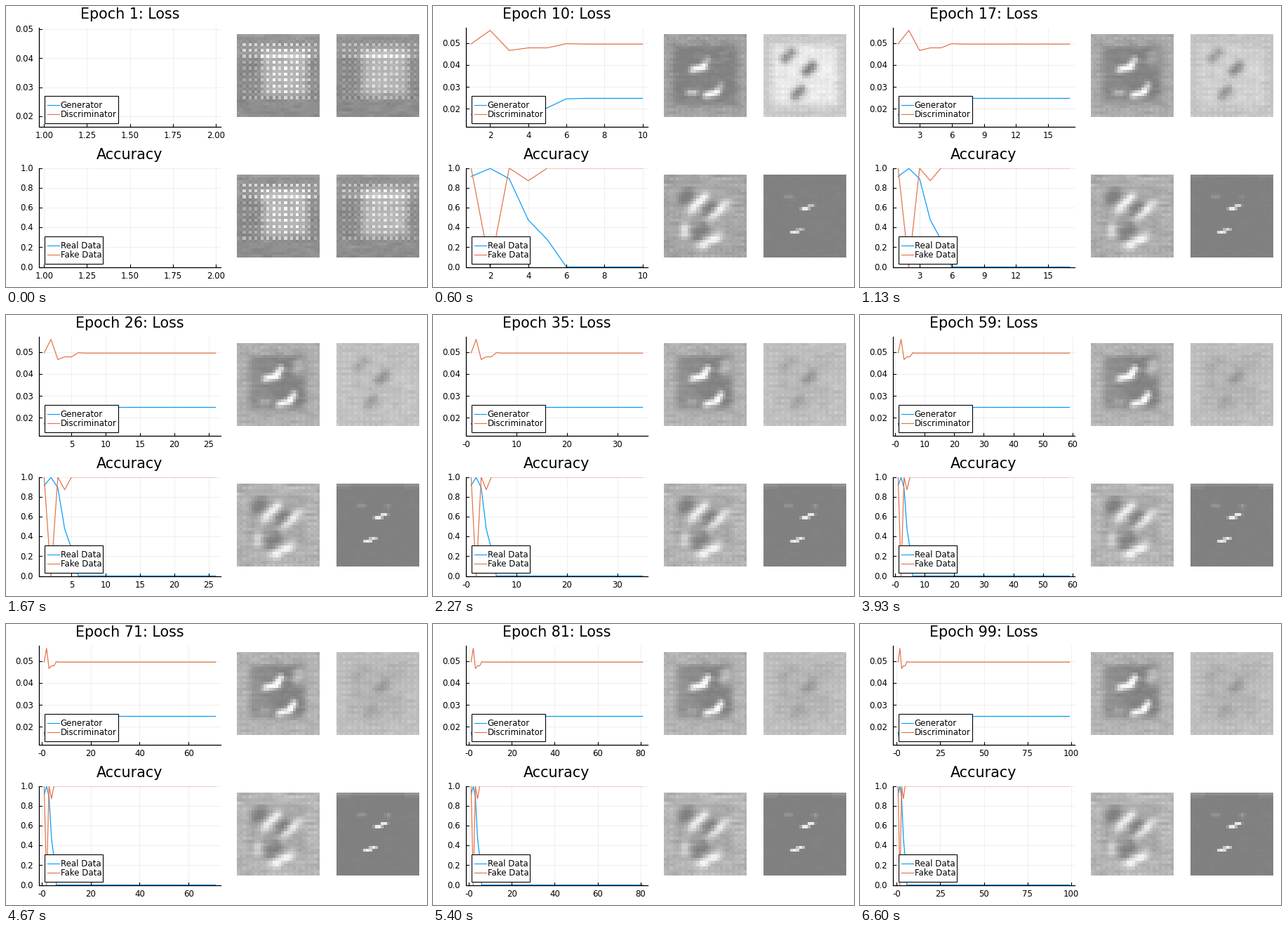
Write a matplotlib script that moves like this. It is 600x400 px and loops after 6.67 s.

```python
import numpy as np
import matplotlib.pyplot as plt
from matplotlib.animation import FuncAnimation
from matplotlib.patches import Rectangle

W, H, EPOCHS, LOOP_MS = 600, 400, 100, 6670
BLUE, ORANGE = "#009af9", "#e26f46"
LEFT, RIGHT, TOP, BOTTOM, DROP = 47, 306, 30.7, 171.5, 200
PX = 0.72  # points per pixel at 100 dpi

plt.rcParams["font.family"] = "DejaVu Sans"
fig = plt.figure(figsize=(W / 100, H / 100), dpi=100, facecolor="white")
ax = fig.add_axes([0, 0, 1, 1])


def text(x, y, s, size=11.77, ha="center"):
    return ax.text(x, y, s, fontsize=size * PX, ha=ha, va="baseline", zorder=6)


def line(xs, ys, color="black", lw=1.1, z=3, **kw):
    return ax.plot(xs, ys, color=color, lw=lw * PX, zorder=z, **kw)[0]


# ---- training history -------------------------------------------------
def history(rest, *start):
    return np.array(start + (rest,) * (EPOCHS - len(start)))


gen = history(.0248, .01747, .01327, .0165, .0186, .0205, .0246)
disc = history(.0495, .0496, .05576, .0466, .0478, .0478, .0497)
real = history(0, .915, .996, .893, .475, .277)
fake = history(1, 1, 0, 1, .872)
epochs = np.arange(1, EPOCHS + 1)


# ---- axis scaling and ticks -------------------------------------------
def padded(lo, hi):
    pad = 0.03 * (hi - lo)
    return lo - pad, hi + pad


def ticks(lo, hi):
    """Pick round ticks by scoring count, zero, coverage and niceness."""
    span, best, found = hi - lo, -np.inf, None
    top = int(np.floor(np.log10(span)))
    for z in (top, top - 1):
        for q, nice in ((5, .9), (3, .2), (2.5, .5), (2, .7), (1, 1)):
            step = q * 10.0 ** z
            k = np.arange(np.ceil(lo / step), np.floor(hi / step) + 1)
            if len(k) < 4:
                continue
            count = max(0, 1 - abs(len(k) - 5) / 5)
            cover = 1.5 * span / ((len(k) - 1) * step)
            score = count / 4 + (0 in k) / 6 + cover / 3 + nice / 4
            if score > best + 1e-9:
                best, found = score, k * step
    return found


def labels(values):
    for digits in range(4):
        if np.allclose(values, np.round(values, digits), atol=1e-6):
            break
    return [f"{v:.{digits}f}" for v in values]


def to_x(v, lim):
    return LEFT + (np.asarray(v) - lim[0]) / (lim[1] - lim[0]) * (RIGHT - LEFT)


def to_y(v, lim, drop=0):
    return drop + BOTTOM - (np.asarray(v) - lim[0]) / (lim[1] - lim[0]) * (BOTTOM - TOP)


def x_ticks(lim, drop):
    parts = []
    values = ticks(*lim)
    for x, s in zip(to_x(values, lim), labels(values)):
        parts += [line([x, x], [TOP + drop, BOTTOM + drop], lw=.8, z=1, alpha=.08),
                  line([x, x], [BOTTOM + drop, BOTTOM + drop - 4]),
                  text(x, 187.6 + drop, s)]
    return parts


def y_ticks(values, lim, drop=0):
    parts = []
    for y, s in zip(to_y(values, lim, drop), labels(values)):
        parts += [line([LEFT, RIGHT], [y, y], lw=.8, z=1, alpha=.08),
                  line([LEFT, LEFT + 4], [y, y]),
                  text(39, y + 4.3, s, ha="right")]
    return parts


def legend(names, right, drop):
    y = 128 + drop
    ax.add_patch(Rectangle((55.4, y), right - 55.4, 38.5, fc="white", ec="black",
                           lw=1.1 * PX, zorder=5))
    for i, (name, color) in enumerate(zip(names, (BLUE, ORANGE))):
        mid = y + 13 + 13 * i
        line([58.5, 76], [mid, mid], color, z=6)
        text(77.6, mid + 4.4, name, ha="left")


def curve(color, drop):
    clip = Rectangle((LEFT, TOP + drop), RIGHT - LEFT, BOTTOM - TOP, transform=ax.transData)
    art = line([], [], color, lw=1.2, z=2)
    art.set_clip_path(clip)
    return art


# ---- generated pictures -----------------------------------------------
N = 28
row, col = np.mgrid[0:N, 0:N].astype(float)
mesh = (row % 2 == 1) & (col % 2 == 0)


def blob(cx, cy, length, width, angle=0):
    a = np.radians(angle)
    dx, dy = col - cx, row - cy
    u = dx * np.cos(a) + dy * np.sin(a)
    v = dy * np.cos(a) - dx * np.sin(a)
    return np.exp(-(u / length) ** 4 / 2 - (v / width) ** 2 / 2)


def box(c0, c1, r0, r1, soft=.7):
    def edge(d):
        return 1 / (1 + np.exp(-d / soft))
    return edge(col - c0) * edge(c1 - col) * edge(row - r0) * edge(r1 - row)


def grain(seed, size):
    g = np.random.default_rng(seed).normal(0, size, (N, N))
    return (g + np.roll(g, 1, 1) + np.roll(g, 2, 1)) / 1.7


def untrained(seed, gain):
    """Checkered upsampling pattern of the first epoch."""
    mid = box(8, 23.5, 4.5, 20.5)
    area = box(.5, 26.5, 1.5, 22.5, .3)
    band = box(-2, 30, 1.5, 7.5, .3)
    img = 142 + 38 * mid + 12 * band + 14 * (row < 1)
    img += gain * area * mesh * (26 + 22 * mid + 34 * band + 14 * (row == 21))
    img += gain * 22 * mid * mesh * ((col % 4 == 0) & (col >= 12))
    img -= 9 * area * (1 - mid) * ((row + col) % 2 == 0)
    img += 16 * (row == 7) * box(7, 25, 0, 27)
    return img + grain(seed, 4)


wide, narrow = box(2.5, 24.5, 3, 23.5), box(3.7, 22.5, 3.7, 21.7)
left_haze = box(3, 10, 4, 21, 1.2)


# Each picture function blends its early look into its late one.
def mix(a, b, late):
    return a + (b - a) * late


def bent_strokes(late):
    inner = mix(wide, narrow, late)
    img = mix(162 - 33 * wide, 178 - 48 * narrow + 17 * left_haze, late)
    img += 8 * mesh * (1 - inner)
    for cx, cy in ((11.2, 11), (15.6, 19.7)):
        img += mix(125, 115, late) * blob(cx, cy, 2.6, .8, -12)
        img += mix(52, 109, late) * blob(cx + 2.7, cy - 2.2, 1.7, .9, -45)
    img += mix(8, 58, late) * blob(20.3, 8, 2.4, 1.5, -70)
    return img + mix(85, 32, late) * blob(9, 19.3, 1.8, .7)


def dark_spots(late):
    img = mix(198 + 36 * wide, 187 - 8 * narrow, late) + 8 * mesh
    for cx, cy, left in ((8, 6.8, 7), (15, 11.3, 26), (11.3, 19.2, 17)):
        img -= mix(78 + left, left, late) * blob(cx, cy, 2.7, 1.3, -45)
    return img


def ring(late):
    inner = mix(wide, narrow, late)
    img = mix(163 + 4 * wide, 180 - 14 * narrow, late)
    img += 8 * mesh * (1 - .7 * inner)
    for cx, cy, angle in ((11.2, 9, -44), (18, 11.5, -42), (15, 22, -25)):
        img += mix(80, 71, late) * blob(cx, cy, 4.1, 1.1, angle)
    img += mix(66, 45, late) * blob(6.5, 18.5, 2.2, 1.1, 90)
    for cx, cy in ((15, 11), (12, 18.8), (7, 7)):
        img -= mix(46, 40, late) * blob(cx, cy, 2.8, 1.5, -42)
    return img


def sparks(late):
    img = 128 + late * (12 * (row < 1) + 8 * (row < 2) * (abs(col - 13.5) > 9))
    for cx, cy in ((13.6, 11), (10, 19)):
        img += 110 * blob(cx, cy, 1.25, .35)
        img += mix(65, 110, late) * blob(cx + 2, cy - 1, 1, .35)
    return img + 18 * blob(8, 7, 1.4, .4) + 38 * late * blob(17, 7.4, .8, .4)


SCENES = (bent_strokes, dark_spots, ring, sparks)
first = [untrained(s, g) for s, g in enumerate((1, .65, 1.05, .75))]
noise = [grain(20 + s, g) for s, g in enumerate((4, 3.5, 5, 1))]


def picture(i, epoch):
    raw = np.exp(-(epoch - 1) / 2.2)
    late = 1 - np.exp(-max(0, epoch - 10) / 10)
    img = SCENES[i](late) + noise[i]
    return np.clip(mix(img, first[i], raw), 128, 250)


# ---- fixed parts ------------------------------------------------------
pictures = []
for i, start in enumerate(first):
    x0, y0 = 329.2 + 141.4 * (i % 2), 41 + DROP * (i // 2)
    pictures.append(ax.imshow(start, cmap="gray", vmin=0, vmax=255, aspect="auto",
                              interpolation="nearest",
                              extent=(x0, x0 + 117.3, y0 + 117.5, y0)))
ax.set(xlim=(0, W), ylim=(H, 0), autoscale_on=False)
ax.axis("off")

for drop in (0, DROP):
    line([LEFT, LEFT, RIGHT], [TOP + drop, BOTTOM + drop, BOTTOM + drop], lw=1.3)
legend(("Generator", "Discriminator"), 159.5, 0)
legend(("Real Data", "Fake Data"), 137.7, DROP)
y_ticks(np.arange(6) / 5, (0, 1), DROP)
title = text(176.5, 18, "", 20.6)
text(176.5, 218.2, "Accuracy", 20.6)
curves = [(curve(c, d), data, d) for c, data, d in
          ((BLUE, gen, 0), (ORANGE, disc, 0), (BLUE, real, DROP), (ORANGE, fake, DROP))]
moving = []


def update(i):
    n = i + 1
    while moving:
        moving.pop().remove()
    title.set_text(f"Epoch {n}: Loss")
    x_lim = padded(1, max(n, 2))
    loss = np.concatenate([gen[:n], disc[:n]])
    loss_lim = padded(loss.min(), loss.max())
    moving.extend(x_ticks(x_lim, 0) + x_ticks(x_lim, DROP))
    moving.extend(y_ticks(ticks(*loss_lim), loss_lim))
    for art, data, drop in curves:
        y_lim = (0, 1) if drop else loss_lim
        art.set_data(to_x(epochs[:n], x_lim), to_y(data[:n], y_lim, drop))
    for k, art in enumerate(pictures):
        art.set_data(picture(k, n))
    return []


anim = FuncAnimation(fig, update, frames=EPOCHS, interval=LOOP_MS / EPOCHS,
                     init_func=lambda: [], repeat=True, repeat_delay=0, blit=False)
plt.show()
```
